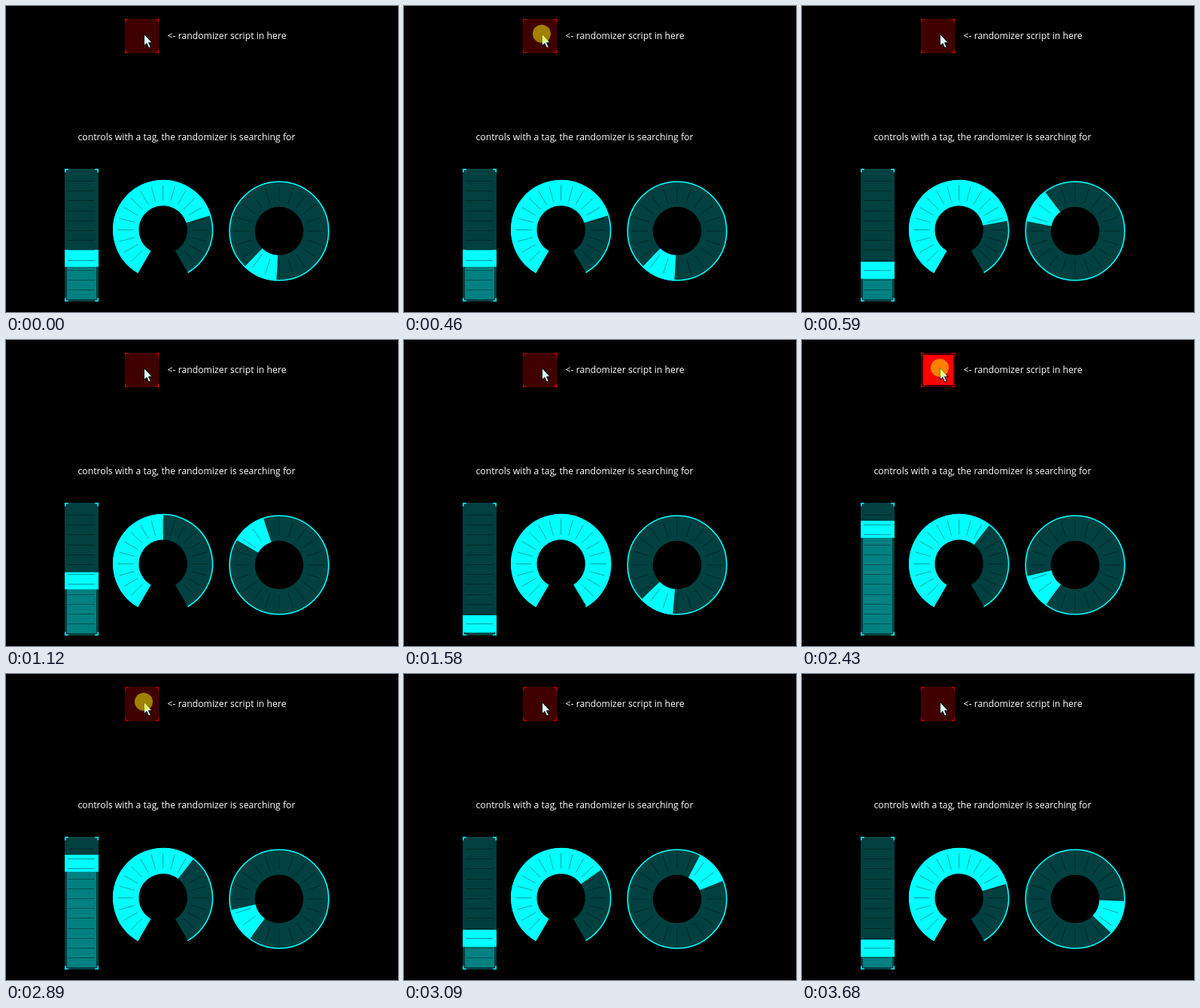
An HTML page with a canvas that plays this animation: 521 by 408 pixels, repeating every 4010 ms.

```html
<!DOCTYPE html>
<html lang="en">
<head>
<meta charset="utf-8">
<style>
  html, body { margin: 0; height: 100%; overflow: hidden; background: #000; }
  canvas { display: block; }
</style>
</head>
<body>
<canvas id="stage" width="521" height="408"></canvas>
<script>
const ctx = document.getElementById('stage').getContext('2d');
const LOOP = 4010;
const BRIGHT = '#0ff', FILL = '#008080', DARK = '#004040', TICK = 'rgba(0,0,0,.38)';

// Each click: pointer down, pointer up, button on, button off,
// then the new slider top, dial end angle and wheel centre angle.
const clicks = [
  [0, 0, 0, 0, 325, -17, 113.5],
  [460, 590, 530, 590, 341, -10.7, 212],
  [990, 1120, 1060, 1120, 309.7, -89.5, 231],
  [1450, 1580, 1450, 1580, 367, 59, 115.5],
  [1910, 2040, 1910, 2040, 363.4, -80, -20],
  [2430, 2560, 2430, 2560, 241, -52, 146.5],
  [2890, 3020, 2950, 3090, 341, -35, -42],
  [3480, 3680, 3480, 3680, 354.3, -16.5, 23]
];

const rad = deg => deg * Math.PI / 180;

function rect(color, x, y, w, h) {
  ctx.fillStyle = color;
  ctx.fillRect(x, y, w, h);
}

function line(color, width, ...points) {
  ctx.strokeStyle = color;
  ctx.lineWidth = width;
  ctx.beginPath();
  points.forEach(([x, y]) => ctx.lineTo(x, y));
  ctx.stroke();
}

function brackets(color, x, y, w, h) {
  const size = 4;
  for (const [cx, dx] of [[x + .75, size], [x + w - .75, -size]])
    for (const [cy, dy] of [[y + .75, size], [y + h - .75, -size]])
      line(color, 1.5, [cx + dx, cy], [cx, cy], [cx, cy + dy]);
}

function sector(color, cx, cy, from, to) {
  ctx.fillStyle = color;
  ctx.beginPath();
  ctx.arc(cx, cy, 66.5, rad(from), rad(to));
  ctx.arc(cx, cy, 32.3, rad(to), rad(from), true);
  ctx.fill();
}

function rim(cx, cy, from, to) {
  ctx.strokeStyle = BRIGHT;
  ctx.lineWidth = 1.6;
  ctx.beginPath();
  ctx.arc(cx, cy, 65.8, rad(from), rad(to));
  ctx.stroke();
}

function radialTicks(cx, cy, start, step, count) {
  for (let i = 0; i < count; i++) {
    const c = Math.cos(rad(start + i * step)), s = Math.sin(rad(start + i * step));
    line(TICK, 1, [cx + 39 * c, cy + 39 * s], [cx + 60 * c, cy + 60 * s]);
  }
}

function slider(top) {
  rect(DARK, 78, 217, 45, 177);
  rect(FILL, 81, top, 39, 391 - top);
  rect(BRIGHT, 78, top, 45, 22.7);
  for (let i = 0; i < 12; i++) {
    const y = Math.round(233 + i * 13.2) + .5;
    line(TICK, 1, [82, y], [118, y]);
  }
  brackets(BRIGHT, 78, 217, 45, 177);
}

function dial(end) {
  const x = 208.7, y = 298.5;
  sector(DARK, x, y, 120, 420);
  sector(BRIGHT, x, y, 120, end + 360);
  rim(x, y, 120, 420);
  radialTicks(x, y, 135, 15, 19);
}

function wheel(mid) {
  const x = 363, y = 300;
  sector(DARK, x, y, 0, 360);
  sector(BRIGHT, x, y, mid - 20.4, mid + 20.4);
  rim(x, y, 0, 360);
  radialTicks(x, y, 90, 18, 20);
}

function cursor() {
  const arrow = new Path2D('M183.5 37.5V53L187 49.8L189.7 56L192.3 54.8L189.6 48.9H194.3Z');
  ctx.fillStyle = '#e0ffff';
  ctx.fill(arrow);
  ctx.strokeStyle = '#000';
  ctx.lineWidth = 1;
  ctx.stroke(arrow);
}

function draw(now) {
  const t = now % LOOP;
  const [, , , , top, end, mid] = clicks.findLast(c => t >= c[2]);
  const pressed = clicks.some(c => t >= c[0] && t < c[1]);
  const lit = clicks.some(c => t >= c[2] && t < c[3]);

  rect('#000', 0, 0, 521, 408);
  rect('#400000', 158, 17, 45.5, 46);
  if (lit) rect('#f00', 161, 20, 40, 40);
  brackets('#b00000', 158, 17, 45.5, 46);

  ctx.fillStyle = '#fff';
  ctx.font = '12.25px "Open Sans", "Noto Sans", sans-serif';
  ctx.textAlign = 'center';
  ctx.fillText('<- randomizer script in here', 293.5, 44);
  ctx.fillText('controls with a tag, the randomizer is searching for', 240, 179);

  slider(top);
  dial(end);
  wheel(mid);
  cursor();
  if (pressed) {
    ctx.fillStyle = 'rgba(255,255,0,.5)';
    ctx.beginPath();
    ctx.arc(183, 37, 12, 0, 2 * Math.PI);
    ctx.fill();
  }
}

const began = performance.now();
function loop() {
  draw(performance.now() - began);
  requestAnimationFrame(loop);
}
loop();
</script>
</body>
</html>
```
